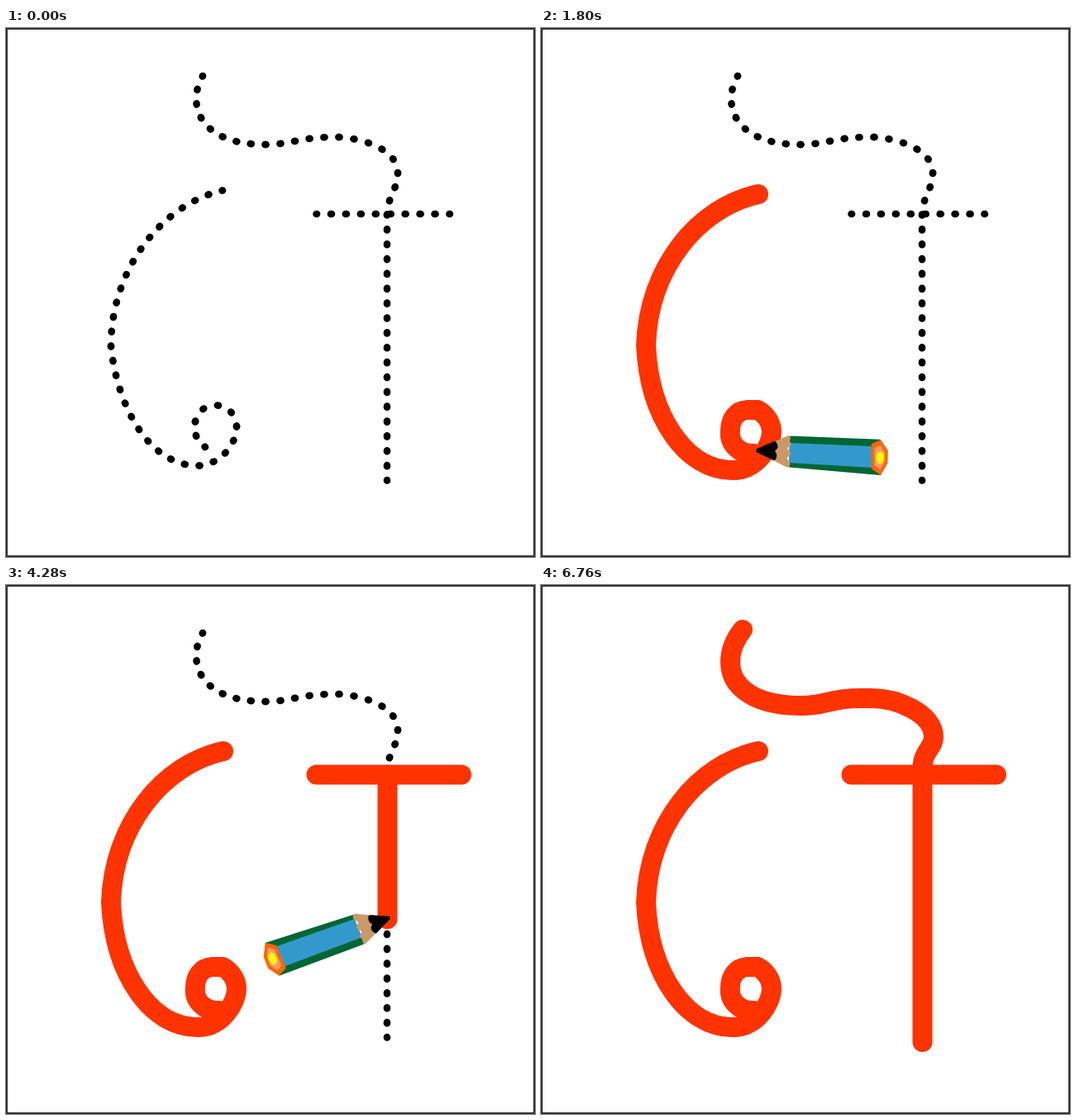
An HTML page for the animation above (6.88 s loop, 640x640 px).

```html
<!DOCTYPE html>
<html lang="en">
<head>
<meta charset="utf-8">
<title>Letter tracing</title>
<style>
  html, body { margin: 0; width: 100%; height: 100%; overflow: hidden; background: #fff; }
  svg { display: block; width: 100vw; height: 100vh; }
  #dots path { fill: none; stroke: #000; stroke-width: 8.6; stroke-linecap: round; stroke-dasharray: .06 .94; stroke-dashoffset: .03; }
  #ink path { fill: none; stroke: #f30; stroke-width: 24; stroke-linecap: round; stroke-linejoin: round; }
</style>
</head>
<body>
<svg viewBox="0 0 640 640">
  <rect width="640" height="640" fill="#fff"/>
  <g id="dots"></g>
  <g id="ink"></g>
  <!-- pencil: tip at the origin, body along +x -->
  <g id="pencil">
    <path fill="#063" stroke="#063" stroke-width="2" stroke-linejoin="round" d="M41,-19 L149,-21 L152,20 L42,17Z"/>
    <path fill="#39c" d="M40,-11.4 L141,-13.4 L142,12.6 L41,12.5Z"/>
    <path fill="#c96" d="M20,-11 L39,-20.5 L41,-18 L40,-13 Q44,-11 41,-8 Q36,-5 40,-2 Q44,1 41,4 Q36,7 40,10 Q44,13 41,18 L38,18 L20,10Z"/>
    <path stroke="#000" stroke-width="3" stroke-linejoin="round" d="M1.5,-.5 L22,-11 Q26,-7 24,-4 Q20,-1 23,2 Q25,5 23,9 L21,9 L1.5,.5Z"/>
    <path id="end" fill="#f60" d="M139,-16 L150,-22 L159.5,-9 L160,6 L152.5,21 L141,14Z"/>
    <path fill="#f96" transform="translate(150 0) scale(.62 .7) translate(-150 0)" d="M139,-16 L150,-22 L159.5,-9 L160,6 L152.5,21 L141,14Z"/>
    <ellipse cx="150.5" cy="0" rx="4.8" ry="7.6" fill="#ff0"/>
  </g>
  <rect x="1" y="1" width="638" height="638" fill="none" stroke="#333" stroke-width="2"/>
</svg>
<script>
const LOOP = 6880, STEP = 40, PENCIL_ON = 40, PENCIL_OFF = 6760;

// [number of gaps between dots, path]
const guides = [
  [8, 'M238,58 C219,90 231,141 314,141'],
  [5, 'M314,141 C345,141 358,131 403,132'],
  [5, 'M403,132 C435,134 474,148 474,175.5'],
  [3, 'M474,175.5 C474,195 461,205 461,226'],
  [9, 'M375.5,225 H537'],
  [18, 'M461,226 V547.5'],
  [14, 'M262,196.5 C190,213 127,290 127,385'],
  [11, 'M127,385 C134,455 172,531 234,529.5'],
  [4, 'M234,529.5 C258,528 279,505 279,482'],
  [4, 'M279,482 C277,450 235,448 229,476'],
  [2, 'M229,476 C227,488 229,498 241,507']
];

// keys: [time, position counted in segments, pencil angle, tip dx, tip dy]
const strokes = [
  {
    parts: ['M263,201', 'C190,217 130,290 127,384', 'C131,470 175,535 232,535', 'C262,535 279,505 279,488',
      'C279,476 270,466 262,462', 'H250', 'C236,463 229,473 229,487', 'C227,503 240,516 258,515'],
    keys: [[40, 0, 30], [720, 1, 31.7], [1200, 2, 0], [1440, 3.6, 0], [1800, 7, 3.4, 2, -4]]
  },
  {
    parts: ['M375.5,229.5', 'H551'],
    keys: [[2440, .023, 108], [3040, 1, 90]]
  },
  {
    parts: ['M461.5,229.5', 'V553'],
    keys: [[3680, 0, 146], [4280, .54, 160.6, 3, -2], [4840, 1, 172]]
  },
  {
    parts: ['M461.5,222', 'C461,202 475,197 475,184', 'C475,155 430,137 400,137', 'H385',
      'C350,137 345,146 315,146', 'C262,146 229,126 229,93', 'C229,78 236,64 244,54'],
    keys: [[5480, 0, 105], [5880, 3.36, 84.2, -11, 3], [6160, 4.28, 130], [6720, 6, 136]]
  }
];

const byId = id => document.getElementById(id);
const pencil = byId('pencil');

function addPath(parent, d) {
  const path = document.createElementNS('http://www.w3.org/2000/svg', 'path');
  path.setAttribute('d', d);
  parent.appendChild(path);
  return path;
}

for (const [gaps, d] of guides) addPath(byId('dots'), d).setAttribute('pathLength', gaps);

for (const stroke of strokes) {
  const path = stroke.path = addPath(byId('ink'), '');
  const lengths = stroke.parts.map((_, i) => {
    path.setAttribute('d', stroke.parts.slice(0, i + 1).join(' '));
    return i ? path.getTotalLength() : 0;
  });
  const lengthAt = pos => {
    const i = Math.min(Math.floor(pos), lengths.length - 2);
    return lengths[i] + (pos - i) * (lengths[i + 1] - lengths[i]);
  };
  stroke.keys = stroke.keys.map(([time, pos, angle, dx = 0, dy = 0]) => [time, lengthAt(pos), angle, dx, dy]);
}

function sample(keys, t) {
  const next = keys.findIndex(key => key[0] > t);
  if (next < 0) return keys[keys.length - 1];
  const a = keys[next - 1], b = keys[next];
  const k = (t - a[0]) / (b[0] - a[0]);
  return a.map((v, i) => v + (b[i] - v) * k);
}

function render(time) {
  const t = Math.floor((time % LOOP) / STEP) * STEP;
  for (const { path, keys } of strokes) {
    const started = t >= keys[0][0];
    path.style.display = started ? '' : 'none';
    if (!started) continue;
    const [, length, angle, dx, dy] = sample(keys, t);
    path.setAttribute('stroke-dasharray', `${length + .01} 9999`);
    const tip = path.getPointAtLength(length);
    pencil.setAttribute('transform', `translate(${tip.x + dx} ${tip.y + dy}) rotate(${angle})`);
  }
  pencil.style.display = t >= PENCIL_ON && t < PENCIL_OFF ? '' : 'none';
}

let start;
function tick(now) {
  start ??= now;
  render(now - start);
  requestAnimationFrame(tick);
}
render(0);
requestAnimationFrame(tick);
</script>
</body>
</html>
```
